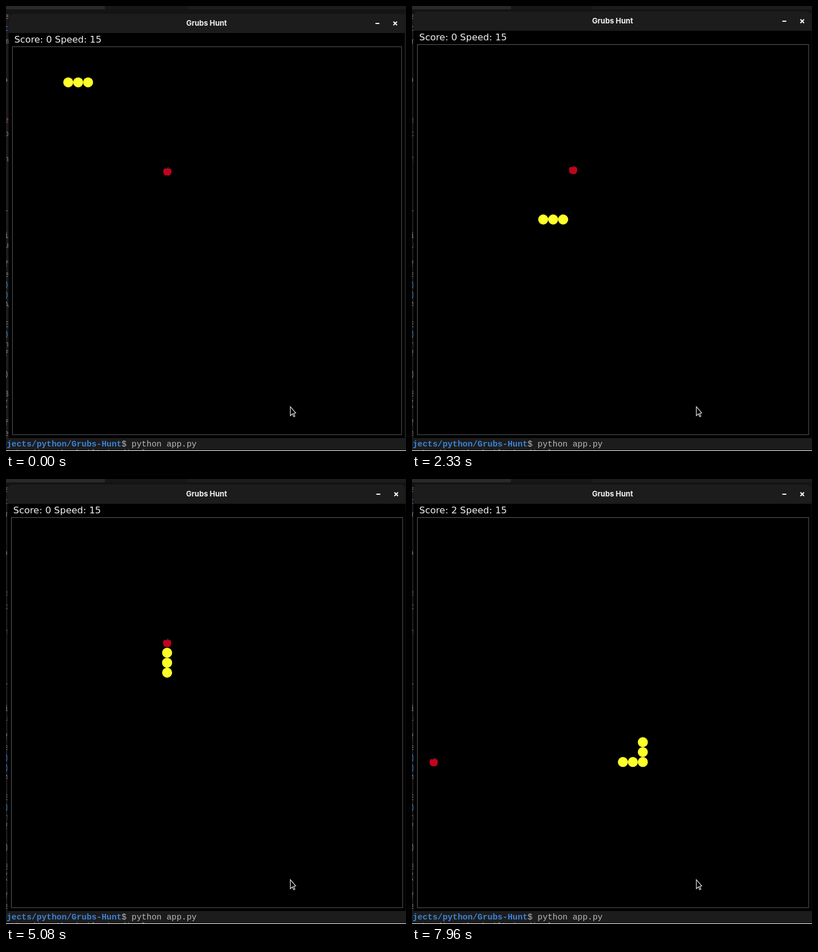
Recreate the animation shown at these times as an HTML page with a canvas. Size 708 px wide and 790 px high, loop 8 s.

```html
<!DOCTYPE html>
<html lang="en">
<head>
<meta charset="utf-8">
<title>Grubs Hunt</title>
<style>
  html, body { margin: 0; width: 100%; height: 100%; overflow: hidden; background: #1c1c1c; }
  canvas { display: block; }
</style>
</head>
<body>
<canvas id="stage" width="708" height="790"></canvas>
<script>
const ctx = document.getElementById('stage').getContext('2d');
const LOOP = 8000;
const STEP = 66.2;
const CELL = 17.63;
const MONO = '14.75px "Liberation Mono", monospace';

// Corners of the snake's route, in grid cells
const corners = [
  [5, 0], [17, 0], [17, 11], [10, 11], [10, 14], [17, 14], [17, 7], [19, 7], [19, 21],
  [15, 21], [15, 4], [23, 4], [23, 23], [19, 23], [19, 21], [22, 21], [22, 17]
];
const apples = [[15, 9], [22, 21], [1, 21]];
const meals = [77, 118];
const route = expand(corners);

// Editor glyphs peeking out behind the window: character, height, colour
const GREY = '#777', BLUE = '#2f78c4', ROSE = '#8a5058';
const margin = [
  ['e', 19, GREY], ['t', 40, BLUE], ['m', 63, GREY], ['+', 132, GREY], ['e', 203, ROSE],
  ['p', 227, GREY], ['n', 272, GREY], ['-', 364, GREY], ['i', 408, GREY], ['u', 425, GREY],
  ['f', 459, GREY], ['e', 477, GREY], [')', 495, BLUE], [')', 513, BLUE], ['A', 531, GREY],
  ['E', 566, GREY], [')', 583, BLUE], ['n', 601, GREY], ['f', 618, GREY], [')', 654, GREY],
  ['3', 689, GREY], ['(', 706, GREY], ['f', 741, GREY], ['e', 759, GREY]
];

function expand(points) {
  const cells = [points[0]];
  for (let i = 1; i < points.length; i++) {
    let [x, y] = points[i - 1];
    const [tx, ty] = points[i];
    while (x !== tx || y !== ty) {
      x += Math.sign(tx - x);
      y += Math.sign(ty - y);
      cells.push([x, y]);
    }
  }
  return cells;
}

const place = ([col, row]) => [20.7 + col * CELL, 132.2 + row * CELL];

function rect(color, x, y, w, h) {
  ctx.fillStyle = color;
  ctx.fillRect(x, y, w, h);
}

function text(str, x, y, font, color, align = 'left') {
  ctx.font = font;
  ctx.fillStyle = color;
  ctx.textAlign = align;
  ctx.fillText(str, x, y);
}

function line(color, width, ...pts) {
  ctx.strokeStyle = color;
  ctx.lineWidth = width;
  ctx.beginPath();
  for (let i = 0; i < pts.length; i += 4) {
    ctx.moveTo(pts[i], pts[i + 1]);
    ctx.lineTo(pts[i + 2], pts[i + 3]);
  }
  ctx.stroke();
}

function disc(color, x, y, r) {
  ctx.fillStyle = color;
  ctx.beginPath();
  ctx.arc(x, y, r, 0, Math.PI * 2);
  ctx.fill();
}

function drawDesktop() {
  rect('#1c1c1c', 0, 0, 708, 790);
  rect('#292929', 0, 0, 175, 6);
  rect('#171717', 175, 0, 145, 6);
  rect('#141414', 0, 6, 708, 8);
  for (const [ch, y, color] of margin) text(ch, 5, y + 4, MONO, color, 'right');

  const edge = 204.6;
  text('ojects/python/Grubs-Hunt', edge, 782, 'bold ' + MONO, '#3c82d6', 'right');
  text('$ python app.py', edge, 782, MONO, '#b9b9b9');
  text('  Loading the built-in display', 0, 798, MONO, '#777');
  rect('#fff', 0, 789, 708, 1);
}

function drawApple(cell) {
  const [x, y] = place(cell);
  ctx.fillStyle = '#c4021f';
  ctx.beginPath();
  ctx.moveTo(x, y - 4);
  ctx.bezierCurveTo(x + 4, y - 7, x + 7.6, y - 4.5, x + 7.4, y);
  ctx.bezierCurveTo(x + 7, y + 6, x + 4, y + 8.6, x, y + 7.2);
  ctx.bezierCurveTo(x - 4, y + 8.6, x - 7, y + 5, x - 7.2, y);
  ctx.bezierCurveTo(x - 7.4, y - 4.5, x - 4, y - 6.5, x, y - 4);
  ctx.fill();
  line('#3f5a38', 1.2, x - 0.5, y - 4, x + 2, y - 7.4);
}

function drawWindow(step) {
  const eaten = meals.filter(m => step >= m).length;

  ctx.fillStyle = '#000';
  ctx.beginPath();
  ctx.roundRect(2.5, 10, 705, 757, [8, 8, 0, 0]);
  ctx.fill();
  ctx.fillStyle = '#1c1c1c';
  ctx.beginPath();
  ctx.roundRect(2.5, 10, 705, 34, [8, 8, 0, 0]);
  ctx.fill();

  text('Grubs Hunt', 355, 31.2, 'bold 13px Inter, sans-serif', '#f4f4f4', 'center');
  line('#fff', 2, 655.5, 27, 662.5, 27);
  line('#fff', 2, 687.5, 23.8, 693.9, 30.2, 693.9, 23.8, 687.5, 30.2);
  text(`Score: ${eaten} Speed: 15`, 12.8, 61, '16.4px "DejaVu Sans", sans-serif', '#f0f0f0');

  ctx.strokeStyle = '#5c5c5c';
  ctx.lineWidth = 1;
  ctx.strokeRect(9.5, 68.5, 692.5, 692.5);

  drawApple(apples[eaten]);
  for (let i = 0; i < 3 + eaten; i++) {
    disc('#ffff2a', ...place(route[step + 2 - i]), 8.9);
  }
}

function drawPointer() {
  const shape = [[503, 711], [503, 727], [506.6, 723.8], [509, 729], [511, 728], [508.8, 723], [512.5, 722]];
  ctx.beginPath();
  for (const [x, y] of shape) ctx.lineTo(x + 0.3, y + 0.3);
  ctx.closePath();
  ctx.fillStyle = '#000';
  ctx.fill();
  ctx.strokeStyle = '#e4e4e4';
  ctx.lineWidth = 1.2;
  ctx.stroke();
}

function draw(t) {
  drawDesktop();
  // The window finishes opening with a small ease-out
  const rest = Math.max(0, 1 - t / 120);
  const scale = 1 - 0.0055 * rest * rest;
  ctx.save();
  ctx.translate(355, 761);
  ctx.scale(scale, scale);
  ctx.translate(-355, -761);
  drawWindow(Math.floor(t / STEP));
  ctx.restore();
  drawPointer();
}

const start = performance.now();
function tick() {
  draw((performance.now() - start) % LOOP);
  requestAnimationFrame(tick);
}
tick();
</script>
</body>
</html>
```
